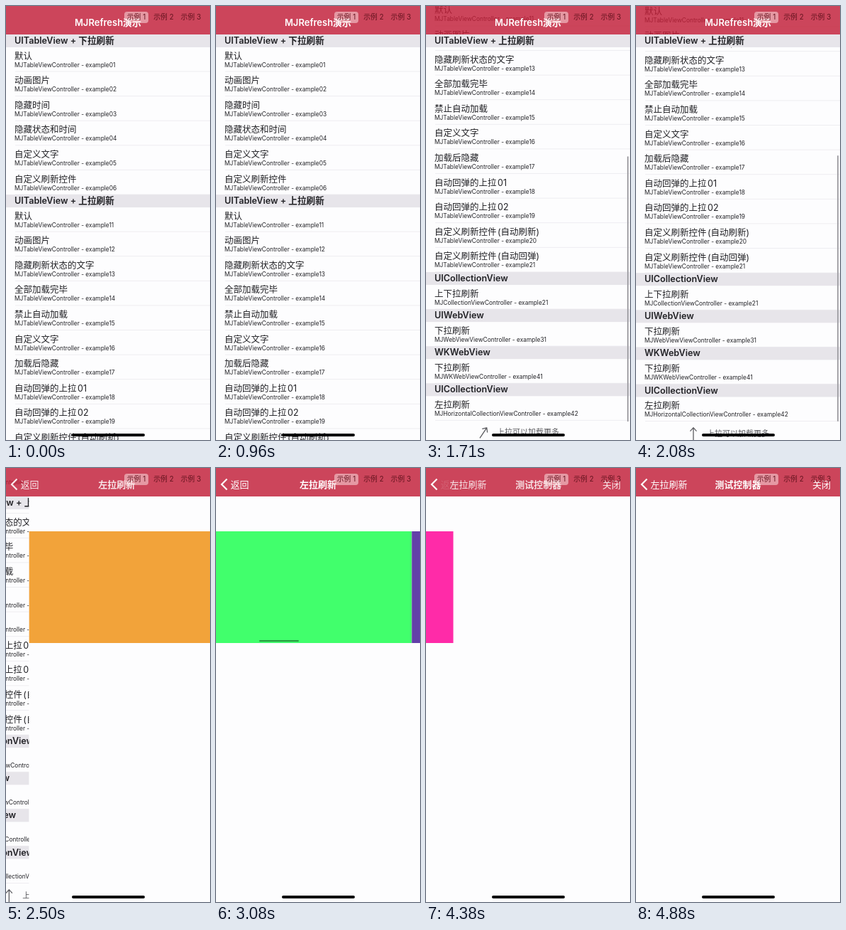
An HTML page that plays this animation: 288 px wide and 610 px high, repeating every 4930 ms.

```html
<!DOCTYPE html>
<html lang="zh-CN">
<head>
<meta charset="utf-8">
<title>MJRefresh演示</title>
<style>
  html, body { margin: 0; width: 100%; height: 100%; overflow: hidden; }
  body { font-family: Inter, "Noto Sans CJK SC", "Noto Sans CJK", sans-serif; color: #222226; background: #fdfdfe; }
  #stage { position: relative; width: 288px; height: 610px; overflow: hidden; }
  #stage div, #stage span, #stage svg { position: absolute; white-space: pre; }
  .screen { left: 0; top: 0; width: 288px; height: 610px; background: #fdfdfe; overflow: hidden; }
  .row { left: 0; top: 0; width: 288px; height: 34.6px; }
  .row::after { content: ""; position: absolute; left: 13px; right: 0; bottom: 0; height: 1px; background: #eeedf1; }
  .row b { position: absolute; left: 12px; top: 4.5px; font-size: 12.5px; font-weight: 400; line-height: 16px; word-spacing: -2px; }
  .row i { position: absolute; left: 12px; top: 20px; font-style: normal; font-size: 8.4px; line-height: 10px; }
  .head { left: 0; top: 0; width: 276px; height: 17.5px; padding-left: 12px; z-index: 1; background: #e7e5ea; font-size: 12.6px; font-weight: 600; line-height: 18px; }
  #foot { left: 0; top: 0; width: 288px; height: 34px; z-index: 1; color: #5c5c60; }
  #hint { left: 0; top: 0; width: 288px; text-align: center; font-size: 11px; line-height: 35px; }
  #arrow { left: 75px; top: 8px; width: 12px; height: 19px; }
  #vbar { right: 2px; top: 0; width: 2.5px; border-radius: 2px; z-index: 2; background: #a6a5aa; }
  #band { left: 0; top: 89px; height: 157px; }
  #band div { top: 0; width: 288px; height: 157px; }
  #hbar { left: 1px; top: 241.5px; width: 56px; height: 2.5px; border-radius: 2px; background: rgba(0, 0, 0, .4); }
  #nav { left: 0; top: 0; width: 288px; height: 40px; background: rgba(194, 30, 56, .82); color: #fff; font-size: 13px; line-height: 18px; }
  #nav span { top: 14px; }
  .title { left: 0; width: 288px; text-align: center; font-weight: 600; }
  .back { left: 20.5px; }
  #close { left: 249px; }
  #chevron { left: 6px; top: 14px; }
  #pill { left: 167px; top: 7.5px; width: 34px; height: 16.5px; border-radius: 4px; background: rgba(255, 236, 236, .5); }
  .tab { top: 8px; width: 40px; text-align: center; font-size: 9.8px; line-height: 16px; color: #64141f; }
  #home { left: 93px; top: 600.5px; width: 103px; height: 4px; border-radius: 2px; background: #000; }
</style>
</head>
<body>
<div id="stage">
  <div class="screen" id="list">
    <div id="foot">
      <svg id="arrow" viewBox="0 0 12 19" fill="none" stroke="#5c5c60" stroke-width="1.3"><path d="M6 18.5V1M1.5 6L6 1l4.5 5"/></svg>
      <span id="hint"></span>
    </div>
    <div id="vbar"></div>
  </div>
  <div class="screen" id="pages"><div id="band"></div><div id="hbar"></div></div>
  <div class="screen" id="blank"></div>
  <div id="nav">
    <svg id="chevron" width="11" height="18" fill="none" stroke="#fff" stroke-width="2.2"><path d="M9.5 1.5L2 9l7.5 7.5"/></svg>
    <span class="back">返回</span>
    <span class="back">左拉刷新</span>
    <span class="title">MJRefresh演示</span>
    <span class="title">左拉刷新</span>
    <span class="title">测试控制器</span>
    <span id="close">关闭</span>
  </div>
  <div id="pill"></div>
  <div id="home"></div>
</div>
<script>
const LOOP = 4930, W = 288, ROW = 34.6, HEAD = 17.5, TOP = 40, BOTTOM = 584;
const MAX = 288, PULL = 33.8;

const sections = [
  ["UITableView + 下拉刷新", "MJTableViewController", 1,
    ["默认", "动画图片", "隐藏时间", "隐藏状态和时间", "自定义文字", "自定义刷新控件"]],
  ["UITableView + 上拉刷新", "MJTableViewController", 11,
    ["默认", "动画图片", "隐藏刷新状态的文字", "全部加载完毕", "禁止自动加载", "自定义文字", "加载后隐藏",
      "自动回弹的上拉 01", "自动回弹的上拉 02", "自定义刷新控件 (自动刷新)", "自定义刷新控件 (自动回弹)"]],
  ["UICollectionView", "MJCollectionViewController", 21, ["上下拉刷新"]],
  ["UIWebView", "MJWebViewViewController", 31, ["下拉刷新"]],
  ["WKWebView", "MJWKWebViewController", 41, ["下拉刷新"]],
  ["UICollectionView", "MJHorizontalCollectionViewController", 42, ["左拉刷新"]]
];
const colors = ["#f2a33a", "#41ff6c", "#6340a8", "#8a3a0c", "#ff2ba8"];

const $ = id => document.getElementById(id);
const clamp = (v, a, b) => Math.min(b, Math.max(a, v));
const out = x => 1 - (1 - x) ** 3;
const inOut = x => x * x * (3 - 2 * x);

// Each key is [ms, value, easing into it].
function at(keys, t) {
  const i = keys.findIndex(k => k[0] > t);
  if (i < 0) return keys[keys.length - 1][1];
  if (i === 0) return keys[0][1];
  const [t0, v0] = keys[i - 1], [t1, v1, ease = inOut] = keys[i];
  return v0 + (v1 - v0) * ease((t - t0) / (t1 - t0));
}

const scroll = [[975, 0], [1385, 343.5, out], [1480, 343.5], [1800, MAX, out]];
const turn = [[1215, 0], [1445, 180], [1545, 180], [1775, 0]];
const paging = [[2780, 0], [2985, 288], [3055, 288], [3270, 576], [3290, 576], [3505, 864],
  [3530, 864], [3787, 1152], [3870, 1152], [4100, 1212], [4180, 1212], [4400, 1152]];
const openPages = [[2320, 0], [2670, 1, out]];
const openBlank = [[4210, 0], [4560, 1, out]];
const vFade = [[975, 0], [1060, 1], [2250, 1], [2400, 0]];
const hFade = [[2780, 0], [2850, 1]];

function add(parent, cls, html) {
  const el = document.createElement("div");
  el.className = cls;
  el.innerHTML = html;
  parent.append(el);
  return el;
}
const moveTo = (el, x, y) => { el.style.transform = `translate(${x}px,${y}px)`; };

const rows = [], heads = [];
let y = TOP;
for (const [name, ctrl, first, titles] of sections) {
  heads.push({ el: add($("list"), "head", name), y });
  y += HEAD;
  titles.forEach((title, i) => {
    const num = String(first + i).padStart(2, "0");
    rows.push({ el: add($("list"), "row", `<b>${title}</b><i>${ctrl} - example${num}</i>`), y });
    y += ROW;
  });
}
const end = y;

colors.forEach((c, i) => {
  const page = add($("band"), "", "");
  page.style.left = i * W + "px";
  page.style.background = c;
});
[1, 2, 3].forEach(n => {
  add($("stage"), "tab", "示例 " + n).style.left = 164 + (n - 1) * 38.5 + "px";
});

const titles = document.querySelectorAll(".title");
const backs = document.querySelectorAll(".back");

function drawList(t) {
  const off = at(scroll, t);
  rows.forEach(r => moveTo(r.el, 0, r.y - off));
  heads.forEach((h, i) => {
    const next = heads[i + 1] ? heads[i + 1].y : end;
    moveTo(h.el, 0, Math.max(h.y - off, Math.min(TOP, next - off - HEAD)));
  });
  moveTo($("foot"), 0, end - off);
  $("hint").textContent = off - MAX > PULL ? "松开立即加载更多" : "上拉可以加载更多";
  $("arrow").style.transform = `rotate(${at(turn, t)}deg)`;
  const over = Math.max(0, off - MAX);
  const barTop = TOP + Math.min(off, MAX) * 170 / MAX + over;
  moveTo($("vbar"), 0, barTop);
  $("vbar").style.height = BOTTOM - 210 - over + "px";
  $("vbar").style.opacity = at(vFade, t);
}

function drawPages(t) {
  const off = at(paging, t);
  moveTo($("band"), -off, 0);
  moveTo($("hbar"), Math.min(off, 1152) * .2, 0);
  $("hbar").style.opacity = at(hFade, t);
}

function drawNav(p, q) {
  // Position of each title: 0 is centred, 1 waits right, -1 has left.
  [-p, 1 - p - q, 1 - q].forEach((d, i) => {
    moveTo(titles[i], d * 110, 0);
    titles[i].style.opacity = clamp(1 - Math.abs(d) * 1.3, 0, 1);
  });
  $("chevron").style.opacity = p;
  backs[0].style.opacity = p * (1 - q);
  backs[1].style.opacity = q;
  moveTo(backs[1], (1 - q) * 98, 0);
  $("close").style.opacity = q;
}

function draw(t) {
  const p = at(openPages, t), q = at(openBlank, t);
  drawList(t);
  drawPages(t);
  moveTo($("list"), -p * W * .3, 0);
  moveTo($("pages"), (1 - p) * W - q * W * .3, 0);
  moveTo($("blank"), (1 - q) * W, 0);
  drawNav(p, q);
}

const start = performance.now();
function tick() {
  draw((performance.now() - start) % LOOP);
  requestAnimationFrame(tick);
}
tick();
</script>
</body>
</html>
```
